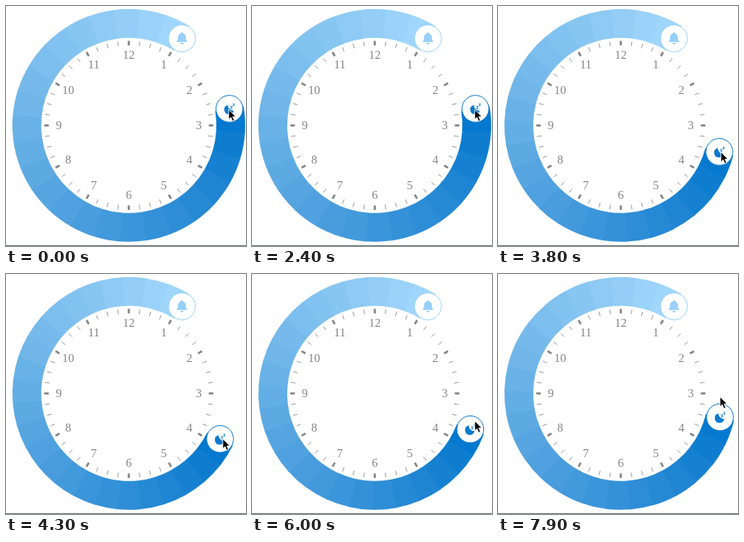
An HTML page for the animation above (8000 ms loop, 300 by 300 pixels).

```html
<!DOCTYPE html>
<html lang="en">
<head>
<meta charset="utf-8">
<title>Bedtime dial</title>
<style>
  html, body { margin: 0; width: 100%; height: 100%; overflow: hidden; background: #fff; }
  svg { display: block; width: 100%; height: 100%; }
  #numbers { font: 15px "Liberation Serif", "Times New Roman", serif; fill: #858585; text-anchor: middle; }
</style>
</head>
<body>
<svg viewBox="0 0 300 300">
  <rect y="299" width="300" height="1" fill="#68777a"/>
  <g transform="translate(153.5 149.3)">
    <g id="arc" fill="none" stroke-width="36"></g>
    <g id="ticks"></g>
    <g id="numbers"></g>
    <g id="alarm" fill="#98d0f8">
      <circle r="16.8" fill="#fff" stroke="#9bd2fa"/>
      <path d="M0-7.6Q1.300-7.600 1.300-6.100C4-5.400 5-3.400 5-.7C5 2 5.500 3 7 4.600H-7C-5.500 3-5 2-5-.7C-5-3.400-4-5.400-1.300-6.100Q-1.300-7.600 0-7.600Z"/>
      <path d="M-2 5.600H2A2 2 0 0 1-2 5.600Z"/>
    </g>
    <g id="bedtime" fill="#0b7ace">
      <circle r="16.8" fill="#fff" stroke="#0b7ace"/>
      <path d="M-2-4.800A6 6 0 1 0 5.400 2.200A7 7 0 0 1-2-4.800Z"/>
      <path d="M1-3H3.500L1.500-.3H4M4.300-6H6.300L4.500-3.800H6.500" fill="none" stroke="#0b7ace" stroke-width=".9"/>
    </g>
  </g>
  <path id="cursor" d="M0 0V12.500L2.900 9.800L4.900 14.600L7.200 13.600L5.200 9H9Z" stroke="#fff" stroke-width=".9"/>
</svg>
<script>
const LOOP = 8000, STEP = 100;
const CENTER = [153.5, 149.3], RADIUS = 127.5, SEGMENTS = 24;
const DARK = [4, 121, 207], LIGHT = [160, 214, 251], CURVE = [0.87, 1, 1.2];

// Angles in degrees, clockwise from 3 o'clock.
const ALARM = 301.4, BED_START = -9.4, BED_LATEST = 31.5, BED_END = 13.5;

const $ = id => document.getElementById(id);

function add(parent, tag, attributes, text = "") {
  const node = document.createElementNS("http://www.w3.org/2000/svg", tag);
  for (const name in attributes) node.setAttribute(name, attributes[name]);
  node.textContent = text;
  return $(parent).appendChild(node);
}

function polar(degrees, radius = RADIUS) {
  const a = degrees * Math.PI / 180;
  return [radius * Math.cos(a), radius * Math.sin(a)];
}

const mix = (from, to, p) => from + (to - from) * p;

function ease(time, start, end) {
  const p = Math.min(1, Math.max(0, (time - start) / (end - start)));
  return p * p * (3 - 2 * p);
}

const place = (id, x, y) => $(id).setAttribute("transform", `translate(${x} ${y})`);

for (let i = 0; i < 48; i++) {
  const isHour = i % 4 === 0;
  const [x1, y1] = polar(i * 7.5, 100), [x2, y2] = polar(i * 7.5, 105.7);
  add("ticks", "line", { x1, y1, x2, y2,
    stroke: isHour ? "#858585" : "#999", "stroke-width": isHour ? 2.6 : 1 });
}

for (let hour = 1; hour <= 12; hour++) {
  const [x, y] = polar(hour * 30 - 90, 87.5);
  add("numbers", "text", { x, y: y + 4.2 }, hour);
}

const segments = Array.from({ length: SEGMENTS }, (_, i) => {
  const p = i / (SEGMENTS - 1);
  const rgb = DARK.map((c, k) => Math.round(mix(c, LIGHT[k], p ** CURVE[k])));
  return add("arc", "path", { stroke: `rgb(${rgb})` });
});

place("alarm", ...polar(ALARM));

function draw(now) {
  const time = Math.floor(now % LOOP / STEP) * STEP;
  const later = ease(time, 2500, 4800);
  const back = ease(time, 5200, 6600);
  const release = ease(time, 6900, 7300);

  const angle = mix(mix(BED_START, BED_LATEST, later), BED_END, back);
  const sweep = (ALARM - angle) / SEGMENTS;
  segments.forEach((segment, i) => {
    const start = angle + i * sweep;
    // A slight overlap hides the seams.
    const end = start + sweep + (i < SEGMENTS - 1 ? 0.4 : 0);
    segment.setAttribute("d", `M${polar(start)}A${RADIUS} ${RADIUS} 0 0 1 ${polar(end)}`);
  });

  // The pointer slides across the knob while dragging, then leaves it.
  const [x, y] = polar(angle);
  const slipX = mix(mix(mix(-1, 4, later), 6.5, back), 0, release);
  const slipY = mix(mix(mix(1, -0.5, later), -17, back), -25.5, release);
  place("bedtime", x, y);
  place("cursor", CENTER[0] + x + slipX, CENTER[1] + y + slipY);
}

const startTime = performance.now();
function tick() {
  draw(performance.now() - startTime);
  requestAnimationFrame(tick);
}
tick();
</script>
</body>
</html>
```
